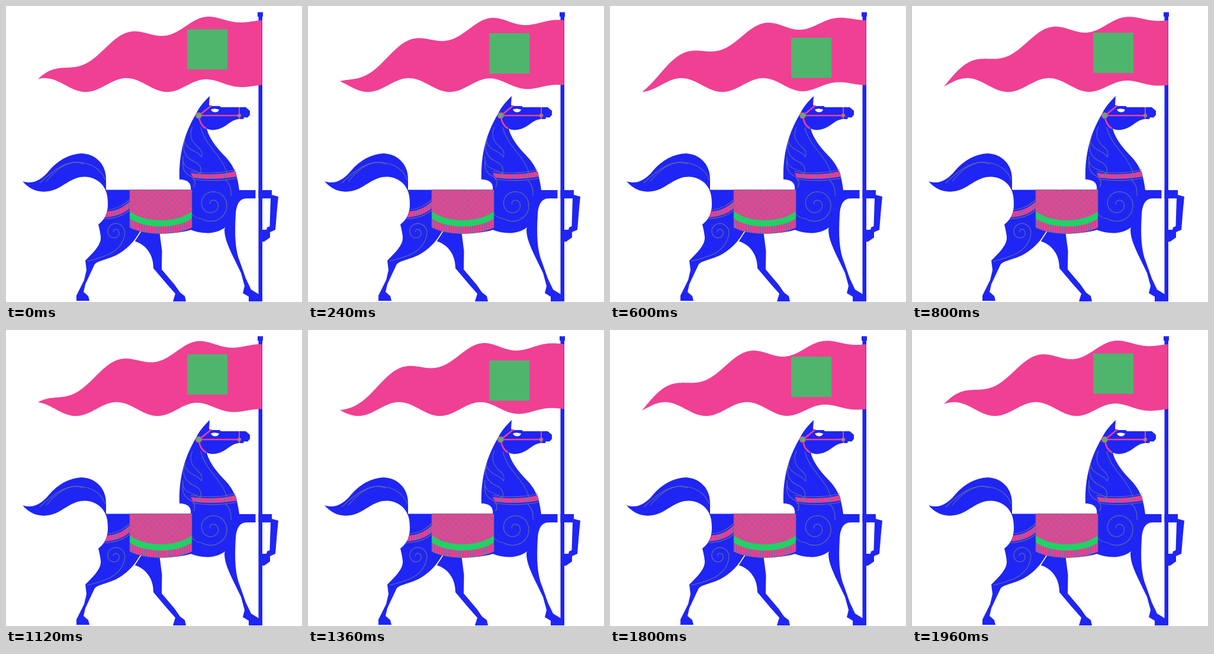
Write an HTML page with a canvas that moves like this. It is 500 by 500 pixels and loops after 2 s.

```html
<!DOCTYPE html>
<html lang="en">
<head>
<meta charset="utf-8">
<title>Horse with banner</title>
<style>
html, body { margin: 0; width: 100%; height: 100%; overflow: hidden; background: #fff; }
canvas { display: block; width: 500px; height: 500px; }
</style>
</head>
<body>
<canvas id="stage" width="500" height="500"></canvas>
<script>
const ctx = document.getElementById('stage').getContext('2d');
const BLUE = '#1f25f5', PINK = '#ef4094', GREEN = '#4fb56d', BRIGHT = '#20d264', LINE = '#626c94';

function fill(d, color) {
  ctx.fillStyle = color;
  ctx.fill(new Path2D(d));
}

function line(d, color = LINE, width = 1.1) {
  ctx.strokeStyle = color;
  ctx.lineWidth = width;
  ctx.stroke(new Path2D(d));
}

function dot(x, y, r, color) {
  ctx.fillStyle = color;
  ctx.beginPath();
  ctx.arc(x, y, r, 0, Math.PI * 2);
  ctx.fill();
}

function clipped(d, draw) {
  ctx.save();
  ctx.clip(new Path2D(d));
  draw();
  ctx.restore();
}

// Pink cloth with thin upright stripes
function striped(d, x0, x1, y0, y1) {
  fill(d, PINK);
  clipped(d, () => {
    for (let x = x0; x < x1; x += 4) line(`M${x} ${y0}V${y1}`, '#855c9c', 1.3);
  });
}

function spiral(cx, cy, r0, r1, from, to) {
  ctx.beginPath();
  for (let i = 0; i <= 80; i++) {
    const k = i / 80, a = from + (to - from) * k, r = r0 + (r1 - r0) * k;
    ctx.lineTo(cx + r * Math.cos(a), cy + r * Math.sin(a));
  }
  ctx.strokeStyle = LINE;
  ctx.lineWidth = 1.2;
  ctx.stroke();
}

function body() {
  // tail
  fill('M28 296C45 302 60 294 72 279C88 260 107 250 128 249C152 250 169 268 169 292V313C163 298 151 290 135 288.5C115 287 100 302 85 309C64 318 43 314 28 296Z', BLUE);
  // far hind leg
  fill('M217 397L229 379H259L263.5 414L263 445L285 471L294 484L302 490L304 499H282L286 486L271 469L249 443C249 421 238 404 217 397Z', BLUE);
  // trunk and near hind leg
  fill('M168 310.5H316V377C290 386 252 386 230 377C216 399 203 412 186 421C167 430 153 430 149 438L134 470L131 483L139 490L141 498H119V489L123 481L132 463L136 446L134 430C149 415 161 403 160 390C159 380 157 374 156 369C168 360 172 348 172 335C172 325 171 318 168 310.5Z', BLUE);
  line('M230 377L217 397', '#fff', 1.5);
  // neck, head, chest and standing foreleg
  fill('M344 152L343 167L346 169H361L363 171H405L412 177V184L408 188.5L402 188L401 191H394C378 192 373 206 354 209C348 210 343 209 339 207C343 223 354 237 368 252C384 268 391 284 394 311H430V325H407C394 325 389 336 388 352C386 386 387 413 395.5 433L405 460L414 479L427 487V499H410V491L400 485L403 473L397 451L381 418C374 402 369 391 369 377L370 374C353 387 329 385 312 378V311C314 299 306 293 293 293C292 260 297 222 321 182C327 170 333 163 344 152Z', BLUE);
  // raised foreleg
  fill('M430 311H449V319L460 322L458 342L455 378L446 382V391L436 398H431V378H440L441 374L445.5 372L447 325H430Z', BLUE);
}

function ornaments() {
  // tail strands
  line('M57 299C78 279 99 262 124 264C146 266 161 277 168 294');
  line('M68 296C88 272 110 258 132 267');
  // neck
  line('M315 204C307 222 317 232 325 239C331 244 332 250 330 255C323 244 311 246 304 234C301 230 301 226 303 223');
  line('M301 231C297 247 306 257 316 262C328 267 332 274 328 284C322 276 310 278 302 269C299 264 298 260 299 254');
  line('M299 263C297 277 304 284 313 288C319 293 321 299 317 306');
  line('M329 205C334 226 348 240 359 255C367 266 371 274 373 282');
  line('M370 293C378 300 381 309 380 321');
  // collar
  striped('M312 282C338 285.5 366 285 388 279L390 288C365 293 340 293 316 290Z', 313, 390, 276, 297);
  line('M312 279.5C338 283 366 282 388 276.5M316 292.5C340 296 365 296 391 290.5');
  // chest and rump scrolls
  spiral(348, 335, 3, 30, -Math.PI, Math.PI * 2.7);
  line('M330 359C324 359 318 356 314 351');
  spiral(184, 382, 2, 17, -Math.PI, Math.PI * 2);
  line('M201 382C200 400 188 414 170 421C157 426 147 429 137 431');
  // rump strap
  striped('M171 347C188 346 200 339 210 329V341C199 351 184 356 167 357Z', 167, 210, 326, 360);
  line('M172 344C188 343 199 336 210 326M166 359.5C183 359 199 354 210 344');
}

function blanket() {
  const cloth = 'M209 310.5H314V374C287 388 236 388 209 374Z';
  striped(cloth, 210, 315, 352, 386);
  const top = 'M209 310.5H314V350C287 366 236 366 209 350Z';
  fill(top, PINK);
  clipped(top, () => {
    for (let x = 140; x < 380; x += 10) {
      line(`M${x} 308l60 60M${x} 308l-60 60`, '#8b6b90', 1.2);
    }
  });
  fill('M209 347C236 367 287 367 314 347V359C287 377 236 377 209 359Z', BRIGHT);
  line(cloth, LINE, 0.7);
}

function bridle() {
  fill('M346 175C350 173 355 173 360 175C358 181 349 181 346 175Z', '#fff');
  line('M326 185H394M326 185L347 168M326 187C327 196 331 203 338 207', PINK, 2.6);
  line('M394 171V191', PINK, 2);
  dot(325.5, 185, 5.5, PINK);
  dot(325.5, 185, 4.2, GREEN);
  dot(394, 185, 3.3, PINK);
  dot(394, 185, 2.2, GREEN);
}

function pole() {
  ctx.fillStyle = '#fff';
  ctx.fillRect(421.5, 310, 5, 16);
  ctx.fillStyle = BLUE;
  ctx.fillRect(426.5, 16, 6.5, 483);
  ctx.fillRect(425, 10.5, 9, 7.5);
}

// The ripple runs left one wavelength a second and fades at the pole
const WAVE = 138, LEFT = 54, RIGHT = 432.5;

function ripple(x, t) {
  const hold = Math.sin(Math.PI / 2 * Math.min(1, (RIGHT - x) / 150));
  return 11.7 * hold * Math.cos(2 * Math.PI * ((x - 134.5) / WAVE + t / 1000));
}

function flag(t) {
  const taper = x => 24 + 109.5 * ((RIGHT - x) / (RIGHT - LEFT)) ** 2.4;
  ctx.beginPath();
  for (let x = LEFT; x <= RIGHT; x += 1.5) ctx.lineTo(x, taper(x) + ripple(x, t));
  ctx.lineTo(RIGHT, 24);
  for (let x = RIGHT; x >= LEFT; x -= 1.5) ctx.lineTo(x, 133.5 + ripple(x, t));
  ctx.closePath();
  ctx.fillStyle = PINK;
  ctx.fill();
  ctx.fillStyle = GREEN;
  ctx.fillRect(306, 47 + 0.8 * ripple(340, t), 68, 68);
}

function frame(now) {
  const t = Math.floor(now % 2000 / 40) * 40;
  ctx.fillStyle = '#fff';
  ctx.fillRect(0, 0, 500, 500);
  body();
  ornaments();
  blanket();
  bridle();
  pole();
  flag(t);
  requestAnimationFrame(frame);
}

frame(0);
</script>
</body>
</html>
```
